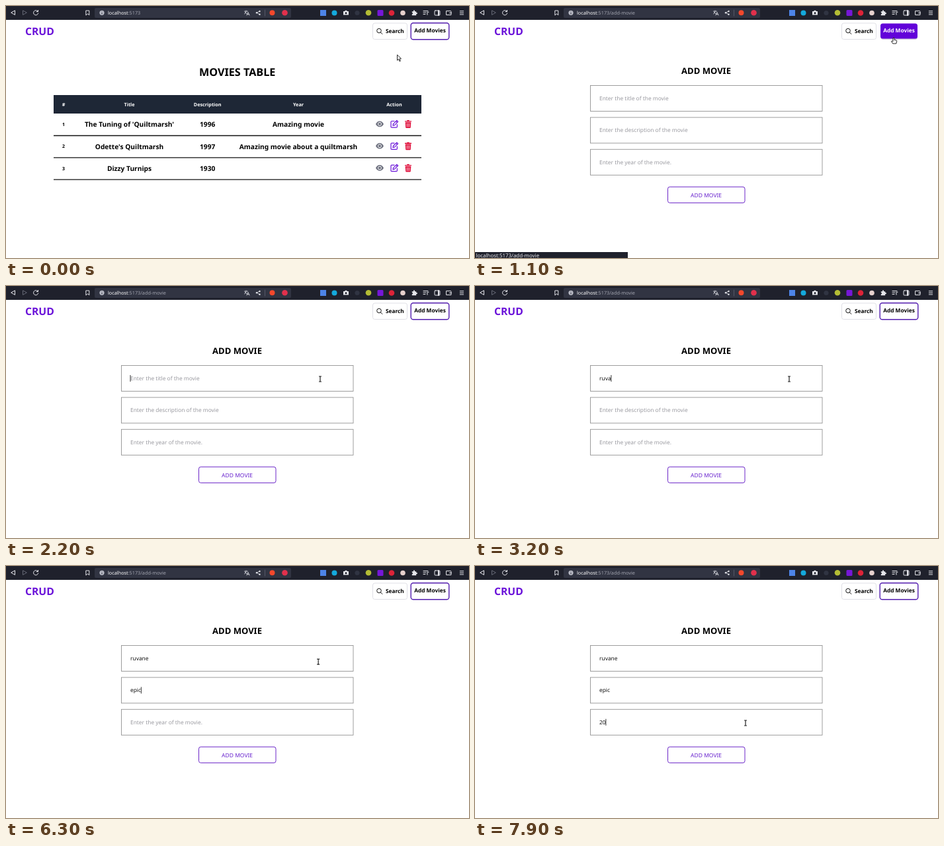
These frames come from a looping animation (700 by 382 pixels, 8 s). An HTML page:

```html
<!DOCTYPE html>
<html lang="en">
<head>
<meta charset="utf-8">
<title>CRUD</title>
<style>
  html, body { margin: 0; width: 100%; height: 100%; overflow: hidden; background: #fff; }
  svg { display: block; width: 100%; height: 100%; }
  text { font-family: "Noto Sans", "Open Sans", sans-serif; text-rendering: geometricPrecision; }
  .mid { text-anchor: middle; }
  .bold { font-weight: 700; }
  .line { fill: none; stroke: #e6e7ec; stroke-width: 1; stroke-linecap: round; stroke-linejoin: round; }
</style>
</head>
<body>
<svg id="stage" viewBox="0 0 700 382">
  <defs>
    <g id="eye">
      <path d="M-6 0Q-3.6-4.4 0-4.4T6 0Q3.6 4.4 0 4.4T-6 0Z" fill="#6f7280"/>
      <circle r="2.5" fill="none" stroke="#fff" stroke-width="1"/>
    </g>
    <g id="edit" fill="none" stroke="#6a14d8" stroke-width="1.2" stroke-linejoin="round">
      <path d="M0.5-4.4H-3.8Q-5-4.4-5-3.2V4Q-5 5.2-3.8 5.2H3.2Q4.4 5.2 4.4 4V0.3"/>
      <path d="M-2 2.3L-1.4-0.2L3.8-5.4L5.7-3.5L0.5 1.7ZM2.5-4.1L4.4-2.2"/>
    </g>
    <g id="trash" fill="#e0103c">
      <path d="M-5-4.6H-2L-1.4-5.8H1.4L2-4.6H5V-3.3H-5Z"/>
      <path d="M-4.3-2.6H4.3L3.8 5Q3.7 6 2.7 6H-2.7Q-3.7 6-3.8 5Z"/>
      <path d="M-2-1V4.5M0-1V4.5M2-1V4.5" stroke="#fff" stroke-width=".7"/>
    </g>
  </defs>
  <rect width="700" height="382" fill="#fff"/>

  <g id="toolbar">
    <rect width="700" height="21" fill="#1f212c"/>
    <rect x="134" y="3" width="297" height="15" rx="2" fill="#313442"/>
    <g class="line">
      <path d="M13.5 7.2V13.4L8 10.3Z"/>
      <path d="M25.5 7.2V13.4L31 10.3Z" stroke="#666976"/>
      <path d="M48 8A3.6 3.6 0 1 0 48.7 11M48.5 6.4V8.6H46.2"/>
      <path d="M121.2 7H125.8V13.8L123.5 11.8L121.2 13.8Z"/>
      <path d="M360.5 8H365.5M363 7V8Q362.5 11 360.5 12M361.5 9.5Q363 11.5 364.5 11.8M364 14L366 9.5L368 14M364.7 12.7H367.3" stroke-width=".8"/>
      <path d="M383.5 8L379 10.3L383.5 12.8" stroke-width=".8"/>
      <path d="M391.5 6V15" stroke="#656877" stroke-width=".7"/>
      <path d="M631 7.5H638M631 10H635M631 12.5H634M637 13.3V9.3H639"/>
      <rect x="648" y="7" width="8" height="7" rx="1"/>
      <path d="M654 7V14" stroke-width="2"/>
      <path d="M666 7.5H672Q673 7.5 673 8.5V13.5H666ZM670.5 10.5H673.5"/>
      <path d="M686.3 7.7H691.7M686.3 10.3H691.7M686.3 12.9H691.7"/>
    </g>
    <circle cx="145" cy="10.3" r="3.6" fill="#b7b9c3"/>
    <path d="M145 8.3V8.9M145 10V12.4" stroke="#313442"/>
    <g fill="#e6e7ec">
      <circle cx="383.5" cy="8" r="1.2"/><circle cx="379" cy="10.3" r="1.2"/><circle cx="383.5" cy="12.8" r="1.2"/>
      <path d="M510 8H512L513 6.7H515L516 8H518V13.5H510Z"/>
      <path d="M613.8 8.2H616Q615.5 6.3 617 6.3T618 8.2H620.2V10Q622 9.5 622 11T620.2 12V14.3H613.8V12.3Q615.2 12 615.2 11.2T613.8 10Z"/>
    </g>
    <circle cx="514" cy="10.7" r="1.5" fill="#1f212c"/>
    <circle cx="402.5" cy="10.3" r="4" fill="#f4482c"/>
    <circle cx="421.5" cy="10.3" r="4.3" fill="#e2304c"/>
    <rect x="475" y="6" width="9" height="9" fill="#4d84e8"/>
    <circle cx="496.5" cy="10.5" r="4" fill="#14a9dc"/>
    <circle cx="531" cy="10.5" r="3.6" fill="#303442"/>
    <circle cx="548" cy="10.3" r="4.3" fill="#b4bd35"/>
    <rect x="561.5" y="6" width="9" height="9" rx="1.5" fill="#7617d8"/>
    <circle cx="583" cy="10.5" r="4.3" fill="#dc2338"/>
    <circle cx="600" cy="10.5" r="3.8" fill="#e5d0cd"/>
    <text x="154" y="12.9" font-size="7.25" fill="#a2a4af"><tspan fill="#fff">localhost</tspan>:5173<tspan id="path"></tspan></text>
  </g>

  <text class="bold" x="29" y="43.8" font-size="15.7" fill="#6a12d9">CRUD</text>
  <rect x="554.5" y="26" width="52" height="24.5" rx="3" fill="#fff" stroke="#dfdfe6"/>
  <g fill="none" stroke="#111" stroke-width="1"><circle cx="564" cy="37.5" r="3.3"/><path d="M566.4 40L569.2 42.8"/></g>
  <text class="bold" x="574" y="41.3" font-size="8.3">Search</text>
  <g id="addIdle">
    <rect x="612.2" y="25.7" width="57.6" height="25" rx="3.5" fill="#fff" stroke="#521cae" stroke-width="1.4"/>
  </g>
  <g id="addHover">
    <rect x="613.5" y="28.5" width="55.5" height="22.3" rx="3.5" fill="#c9c4d6"/>
    <rect x="613" y="26.5" width="56" height="23" rx="3.5" fill="#6202d9"/>
  </g>
  <text id="addLabel" class="mid bold" x="641" y="40.3" font-size="8.35">Add Movies</text>

  <g id="listPage">
    <text class="mid bold" x="349.7" y="105.6" font-size="16.2">MOVIES TABLE</text>
    <rect x="72" y="135" width="556" height="28" fill="#1e2736"/>
  </g>
  <g id="formPage">
    <text class="mid bold" x="349.5" y="103" font-size="13">ADD MOVIE</text>
    <rect x="291.5" y="274.2" width="116.5" height="24.2" rx="3" fill="#fff" stroke="#6b25c8"/>
    <text class="mid" x="349.6" y="289.5" font-size="8.5" fill="#6a25cf">ADD MOVIE</text>
    <path id="caret" stroke="#000" stroke-width=".8"/>
  </g>

  <g id="status">
    <rect id="statusBar" y="373" height="9" fill="#1f212c"/>
    <text x="1.5" y="380.6" font-size="7.9" fill="#e8e8ee">localhost:5173/add-movie</text>
  </g>

  <g id="arrow"><path d="M0 0V8.4L2 6.6L3.5 9.9L4.9 9.3L3.4 6.1L6 5.8Z" fill="#fff" stroke="#111" stroke-width=".9" stroke-linejoin="round"/></g>
  <g id="hand"><path d="M-1 .8Q0-.6 1 .8V3.3L4 4Q5 4.3 4.7 5.4L3.8 9H-1.2L-3.6 5.6Q-3.4 4.4-1 5.6Z" fill="#fff" stroke="#111" stroke-width=".9" stroke-linejoin="round"/></g>
  <g id="beam"><path d="M-2-4H-.6L0-3.5L.6-4H2M0-3.5V3.5M-2 4H-.6L0 3.5L.6 4H2" fill="none" stroke="#222" stroke-width="1.2"/></g>
</svg>
<script>
const LOOP = 8000, STEP = 100;
const $ = id => document.getElementById(id);

function add(parent, tag, attrs, content = "") {
  const node = document.createElementNS("http://www.w3.org/2000/svg", tag);
  for (const key in attrs) node.setAttribute(key, attrs[key]);
  node.textContent = content;
  return parent.appendChild(node);
}
const show = (id, on) => $(id).setAttribute("display", on ? "inline" : "none");

// Movie table
const columns = [87, 186.5, 304.7, 442, 587];
const movies = [
  ["The Tuning of 'Quiltmarsh'", "1996", "Amazing movie"],
  ["Odette's Quiltmarsh", "1997", "Amazing movie about a quiltmarsh"],
  ["Dizzy Turnips", "1930", ""]
];
const list = $("listPage");
["#", "Title", "Description", "Year", "Action"].forEach((label, i) =>
  add(list, "text", { class: "mid bold", x: columns[i], y: 151.6, "font-size": 7.25, fill: "#fff" }, label));
movies.forEach((movie, row) => {
  const y = 179.3 + row * 33.3;
  add(list, "text", { class: "mid", x: 87, y: y + 2.7, "font-size": 7, "font-weight": 600 }, row + 1);
  movie.forEach((cell, i) =>
    add(list, "text", { class: "mid bold", x: columns[i + 1], y: y + 4, "font-size": 10.2 }, cell));
  [["eye", 565], ["edit", 587], ["trash", 608]].forEach(([icon, x]) =>
    add(list, "use", { href: "#" + icon, transform: `translate(${x} ${y - 0.4})` }));
  add(list, "path", { d: `M72 ${y + 17.2}H628`, stroke: "#111", "stroke-width": 1.3 });
});

// Form fields, with the times at which each letter is typed
const fields = [
  { hint: "Enter the title of the movie", text: "ruvane", keys: [2800, 2900, 3000, 3200, 3300, 3500] },
  { hint: "Enter the description of the movie", text: "epic", keys: [5300, 5500, 5800, 5900] },
  { hint: "Enter the year of the movie.", text: "20", keys: [7600, 7900] }
];
fields.forEach((field, i) => {
  field.y = 140 + i * 48.4;
  add($("formPage"), "rect", { x: 174.5, y: field.y - 19.5, width: 350.5, height: 39, fill: "#fff", stroke: "#929292", "stroke-width": .9 });
  field.label = add($("formPage"), "text", { x: 188, y: field.y + 3, "font-size": 8.4 });
});
$("formPage").append($("caret"));

// Pointer moves: start, end, from, bend, to
const moves = [
  [300, 800, [591.5, 74], [614, 60], [633, 48]],
  [1400, 2100, [633, 48], [619, 90], [475, 141]],
  [6200, 7000, [475, 141], [442, 190], [409, 238]]
];
function pointerAt(t) {
  const [start, end, a, b, c] = moves.filter(m => t >= m[0]).pop() || moves[0];
  const p = Math.min(1, Math.max(0, (t - start) / (end - start)));
  const s = p * p * (3 - 2 * p);
  return [0, 1].map(i => (1 - s) ** 2 * a[i] + 2 * s * (1 - s) * b[i] + s * s * c[i]);
}

function drawField(field, t) {
  const typed = field.text.slice(0, field.keys.filter(k => t >= k).length);
  field.label.textContent = typed || field.hint;
  field.label.setAttribute("fill", typed ? "#111" : "#9a9aa0");
  return typed;
}

function drawCaret(t, typed) {
  const active = t < 3800 ? 0 : t < 7000 ? 1 : 2;
  const focusTime = [2200, 3800, 7000][active];
  const lastKey = Math.max(focusTime, ...fields[active].keys.filter(k => k <= t));
  const lit = Math.floor((t - lastKey) / 600) % 2 === 0;
  show("caret", t >= 2200 && lit);
  const x = 188 + (typed[active] ? fields[active].label.getComputedTextLength() + .3 : 0);
  $("caret").setAttribute("d", `M${x} ${fields[active].y - 5}v10`);
}

function render(time) {
  const t = Math.floor((time % LOOP) / STEP) * STEP;
  const onForm = t >= 1100;
  show("listPage", !onForm);
  show("formPage", onForm);
  $("path").textContent = onForm ? "/add-movie" : "";

  const [x, y] = pointerAt(t);
  const hover = x > 612 && x < 670 && y > 25 && y < 51;
  const overField = onForm && x > 174 && x < 525 && fields.some(f => Math.abs(y - f.y) < 19.5);
  const shape = hover ? "hand" : overField ? "beam" : "arrow";
  for (const id of ["hand", "beam", "arrow"]) show(id, id === shape);
  $(shape).setAttribute("transform", `translate(${x} ${y})`);

  show("addIdle", !hover);
  show("addHover", hover);
  $("addLabel").setAttribute("fill", hover ? "#fff" : "#000");
  show("status", t >= 1000 && t < 1700);
  $("statusBar").setAttribute("width", t < 1100 ? 99.5 : t < 1200 ? 231 : 240);

  drawCaret(t, fields.map(field => drawField(field, t)));
}

const begin = performance.now();
function tick() {
  render(performance.now() - begin);
  requestAnimationFrame(tick);
}
tick();
</script>
</body>
</html>
```
